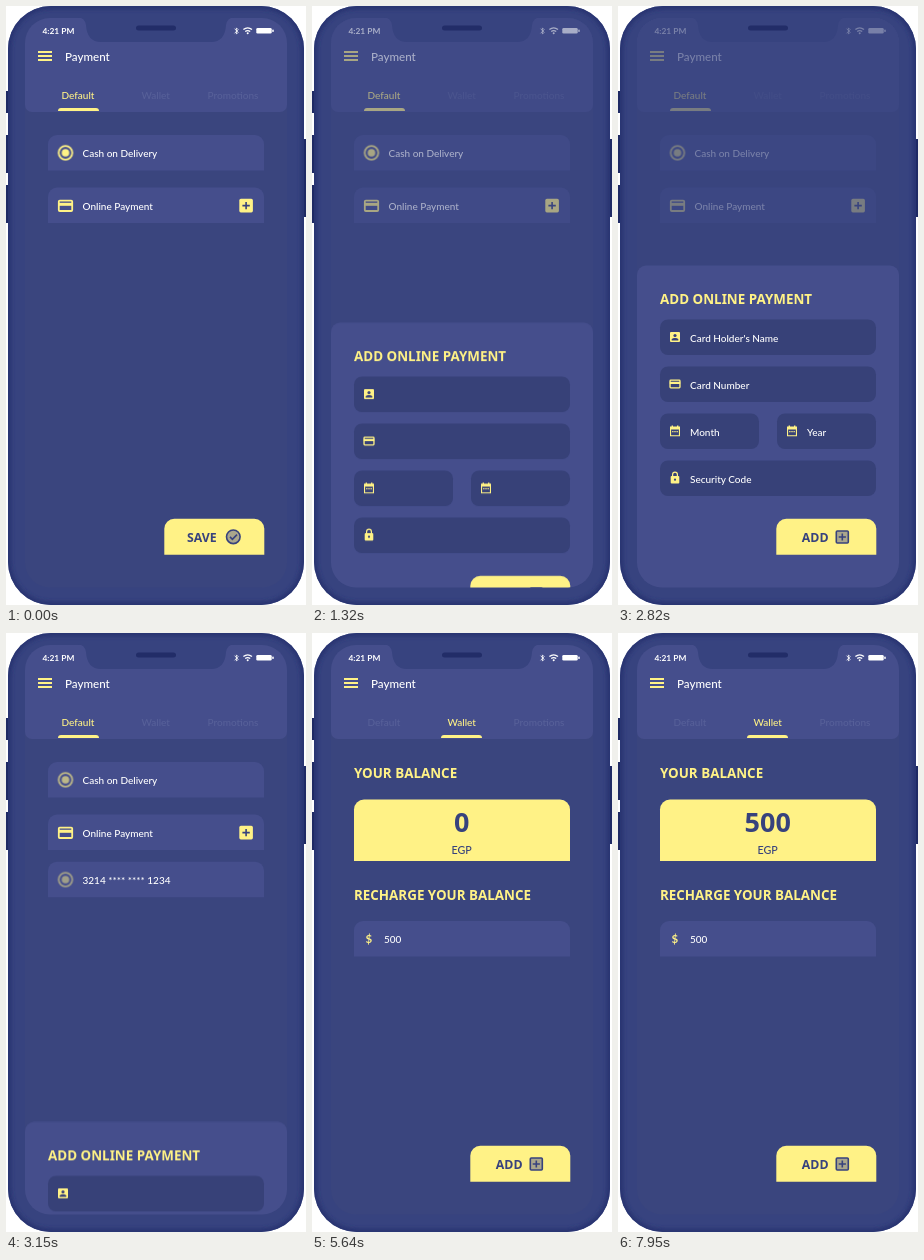
Write an HTML page that moves like this. It is 300 px wide and 599 px high and loops after 8 s.

```html
<!DOCTYPE html>
<html lang="en">
<head>
<meta charset="utf-8">
<title>Payment</title>
<style>
  html, body { margin: 0; width: 100%; height: 100%; overflow: hidden; background: #fff; }
  #stage { display: block; width: 300px; height: 599px; }
  text { font: 500 10px Lato, "Noto Sans", sans-serif; fill: #fff; }
  .title, .button, .amount { font-family: "Noto Sans", "Open Sans", sans-serif; font-weight: 700; }
  .title { font-size: 13.4px; fill: #fff286; }
  .button { font-size: 12.3px; fill: #37427d; }
  .amount { font-size: 27px; text-anchor: middle; fill: #37427d; }
  .tab { text-anchor: middle; fill: #576099; }
  .row { fill: #454e8c; }
  .input { fill: #374178; }
  .yellow { fill: #fff286; }
  .line { fill: none; stroke: #fff286; stroke-width: 1.8; }
  .navy { fill: none; stroke: #37427d; stroke-width: 1.6; }
</style>
</head>
<body>
<svg id="stage" viewBox="0 0 300 599">
  <defs>
    <clipPath id="bodyClip"><rect x="2" y="0" width="296" height="599" rx="43"/></clipPath>
    <clipPath id="screenClip"><rect x="19" y="12" width="262" height="569.5" rx="25"/></clipPath>
    <filter id="soft"><feGaussianBlur stdDeviation="2"/></filter>

    <path id="rowShape" d="M0 35.5V9a9 9 0 0 1 9-9H207a9 9 0 0 1 9 9V35.5Z"/>
    <path id="buttonShape" d="M0 36V10a10 10 0 0 1 10-10H90a10 10 0 0 1 10 10V36Z"/>
    <g id="radio">
      <circle class="line" r="6.8"/>
      <circle class="yellow" r="3.8"/>
    </g>
    <g id="card">
      <rect class="line" x="-6.7" y="-5.2" width="13.4" height="10.4" rx="1"/>
      <path class="yellow" d="M-7-3H7V0H-7Z"/>
    </g>
    <g id="person">
      <rect class="yellow" x="-5" y="-5" width="10" height="10" rx="1"/>
      <circle fill="#374178" cy="-1.5" r="1.6"/>
      <path fill="#374178" d="M-3.3 3.4V2.6C-3.3 .6 3.3 .6 3.3 2.6V3.4Z"/>
    </g>
    <g id="calendar">
      <path class="yellow" fill-rule="evenodd" d="M-5-4.500H-3.4V-5.6H-2V-4.500H2V-5.6H3.4V-4.500H5V5.300H-5ZM-3.9-1.4V4.200H3.9V-1.4Z"/>
      <path class="yellow" d="M-2.8 0h1.3v1.3h-1.3zM-.65 0h1.3v1.3h-1.3zM1.500 0h1.3v1.3h-1.3z"/>
    </g>
    <g id="lock">
      <rect class="yellow" x="-4.300" y="-2" width="8.600" height="7.500" rx="1"/>
      <path class="line" d="M-2.4-2V-3.4a2.4 2.4 0 0 1 4.8 0V-2" style="stroke-width:1.2"/>
      <circle fill="#374178" cy="1.7" r="1.1"/>
    </g>
    <g id="addButton">
      <use href="#buttonShape" class="yellow"/>
      <text class="button" x="25.500" y="23.700">ADD</text>
      <g transform="translate(66 18.3)">
        <rect class="navy" x="-6" y="-6" width="12" height="12" rx="1" style="fill:#aaa68c"/>
        <path class="navy" d="M-3.6 0H3.6M0-3.6V3.6"/>
      </g>
    </g>
  </defs>

  <!-- phone -->
  <path fill="#1f2a64" d="M0 85h3v22h-3zM0 129h3v38h-3zM0 179h3v38h-3zM297 133h3v78h-3z"/>
  <g clip-path="url(#bodyClip)">
    <rect width="300" height="599" fill="#37437f"/>
    <rect x="2" y="0" width="296" height="599" rx="43" fill="none" stroke="#25326f" stroke-width="6" filter="url(#soft)"/>
  </g>

  <g clip-path="url(#screenClip)">
    <rect x="19" y="12" width="262" height="570" fill="#3a457e"/>
    <rect class="row" x="19" y="0" width="262" height="106" rx="7"/>

    <text x="36.5" y="28" style="font-size:8.4px;font-weight:700">4:21 PM</text>
    <g fill="none" stroke="#fff">
      <path d="M228.6 22.7l3.6 3.6-1.8 1.8v-6.2l1.8 1.8-3.6 3.6" stroke-width=".8"/>
      <path d="M237.4 23.6q4.3-3.6 8.6 0M239.2 25.6q2.5-2 5 0" stroke-width="1.3"/>
    </g>
    <g fill="#fff">
      <circle cx="241.7" cy="27.3" r="1"/>
      <rect x="250.3" y="22" width="15.4" height="5.6" rx="1.3"/>
      <rect x="266.3" y="23.6" width="1.4" height="2.5" rx=".6"/>
    </g>
    <path class="line" d="M32 46h14M32 50h14M32 54h14"/>
    <text x="59" y="55" style="font-size:11.6px">Payment</text>

    <text id="tabDefault" class="tab" x="72" y="92.5">Default</text>
    <text id="tabWallet" class="tab" x="149.7" y="92.5">Wallet</text>
    <text class="tab" x="227" y="92.5">Promotions</text>
    <path id="underline" class="yellow" d="M52 105q0-3 3-3h35q3 0 3 3z"/>

    <g id="pages">
      <g id="defaultPage">
        <use href="#rowShape" class="row" x="42" y="129"/>
        <use id="cashRadio" href="#radio" x="59.5" y="146.8"/>
        <text x="76.5" y="150.8">Cash on Delivery</text>

        <use href="#rowShape" class="row" x="42" y="181.5"/>
        <use href="#card" x="59.5" y="199.8"/>
        <text x="76.5" y="203.7">Online Payment</text>
        <rect class="yellow" x="233.3" y="192.8" width="13.6" height="13.6" rx="1.6"/>
        <path class="navy" d="M236.4 199.6h7.4M240.1 195.9v7.4"/>

        <g id="savedCard">
          <use href="#rowShape" class="row" x="42" y="228.7"/>
          <use id="savedRadio" href="#radio" x="59.5" y="246.6"/>
          <text x="76.5" y="250.6">3214 **** **** 1234</text>
        </g>

        <use href="#buttonShape" class="yellow" x="158.3" y="512.7"/>
        <text class="button" x="181" y="536.4">SAVE</text>
        <circle class="navy" cx="227.3" cy="530.8" r="6.8" style="fill:#aaa68c"/>
        <path class="navy" d="M224 530.9l2.4 2.4 4.6-4.7"/>
      </g>

      <g id="walletPage" transform="translate(258 0)">
        <text class="title" x="42" y="145">YOUR BALANCE</text>
        <path class="yellow" d="M42 228V176.5a10 10 0 0 1 10-10H248a10 10 0 0 1 10 10V228Z"/>
        <text id="balanceBefore" class="amount" x="149.7" y="199">0</text>
        <text id="balanceAfter" class="amount" x="149.7" y="199">500</text>
        <text x="149.7" y="220.5" text-anchor="middle" style="font-size:10.7px;fill:#37427d">EGP</text>
        <text class="title" x="42" y="267">RECHARGE YOUR BALANCE</text>
        <use href="#rowShape" class="row" x="42" y="288"/>
        <text x="53.5" y="310" style="font-size:11.5px;font-weight:700;fill:#fff286">$</text>
        <text id="amountHint" x="72" y="309.7">Write Amount</text>
        <text id="amountTyped" x="72" y="309.7">500</text>
        <use href="#addButton" x="158.3" y="512.7"/>
      </g>
    </g>

    <rect id="dim" x="19" y="12" width="262" height="570" fill="#39447f"/>

    <g id="sheet">
      <rect class="row" x="19" y="259.5" width="262" height="345" rx="9"/>
      <text class="title" x="42" y="298.2">ADD ONLINE PAYMENT</text>
      <g id="fields"></g>
      <use href="#addButton" x="158.3" y="512.7"/>
    </g>
  </g>

  <!-- notch -->
  <path d="M72 11h156q-7 1-8 8q-1 17-15 17H95q-14 0-15-17q-1-7-8-8z" fill="#37437f"/>
  <rect x="130" y="19.5" width="40" height="5" rx="2.5" fill="#222d68"/>
</svg>

<script>
const LOOP = 8000;
const YELLOW = '#fff286', FAINT = '#576099';
const SMOOTH = 'cubic-bezier(.65,0,.35,1)';

const fields = [
  ['person', "Card Holder's Name", 42, 313.5, 216],
  ['card', 'Card Number', 42, 360.5, 216],
  ['calendar', 'Month', 42, 407.5, 99],
  ['calendar', 'Year', 159, 407.5, 99],
  ['lock', 'Security Code', 42, 454.5, 216],
];
document.getElementById('fields').innerHTML = fields.map(([icon, label, x, y, width]) => {
  const scale = icon === 'card' ? 0.74 : 1;
  return `<rect class="input" x="${x}" y="${y}" width="${width}" height="35.5" rx="8"/>
    <use href="#${icon}" transform="translate(${x + 15} ${y + 17.5}) scale(${scale})"/>
    <text class="hint" x="${x + 30}" y="${y + 22}">${label}</text>`;
}).join('');

// Each step is [start, end, value reached at end].
function play(selector, property, initial, steps, easing = 'linear') {
  const frames = [{ offset: 0, [property]: initial }];
  let value = initial;
  for (const [start, end, next] of steps) {
    frames.push({ offset: start / LOOP, [property]: value, easing });
    frames.push({ offset: end / LOOP, [property]: next });
    value = next;
  }
  frames.push({ offset: 1, [property]: value });
  for (const el of document.querySelectorAll(selector)) {
    const motion = el.animate(frames, { duration: LOOP, iterations: Infinity });
    motion.startTime = 0;
  }
}

const shift = (x, y) => `translate(${x}px, ${y}px)`;

// Sheet for adding a card
play('#sheet', 'transform', shift(0, 323), [[840, 1585, shift(0, 0)], [2865, 3357, shift(0, 323)]], SMOOTH);
play('#dim', 'opacity', 0, [[840, 1585, 0.68], [2840, 3120, 0]]);
play('.hint', 'opacity', 0, [[1650, 1950, 1], [2840, 3100, 0]]);

// Saved card becomes the selected method
play('#savedCard', 'opacity', 0, [[2860, 3120, 1]]);
play('#savedRadio', 'opacity', 0, [[2960, 3350, 1]]);
play('#cashRadio', 'opacity', 1, [[2860, 3350, 0.4]]);

// Swipe to the wallet
const swipe = [4200, 4860];
play('#pages', 'transform', shift(0, 0), [[...swipe, shift(-258, 0)]], SMOOTH);
play('#underline', 'transform', shift(0, 0), [[...swipe, shift(77, 0)]], SMOOTH);
play('#tabDefault', 'fill', YELLOW, [[4560, 4860, FAINT]]);
play('#tabWallet', 'fill', FAINT, [[4560, 4860, YELLOW]]);

// Recharge
play('#amountHint', 'opacity', 1, [[5070, 5450, 0]]);
play('#amountTyped', 'opacity', 0, [[5070, 5450, 1]]);
play('#balanceBefore', 'opacity', 1, [[6200, 6600, 0]]);
play('#balanceAfter', 'opacity', 0, [[6200, 6600, 1]]);
</script>
</body>
</html>
```
